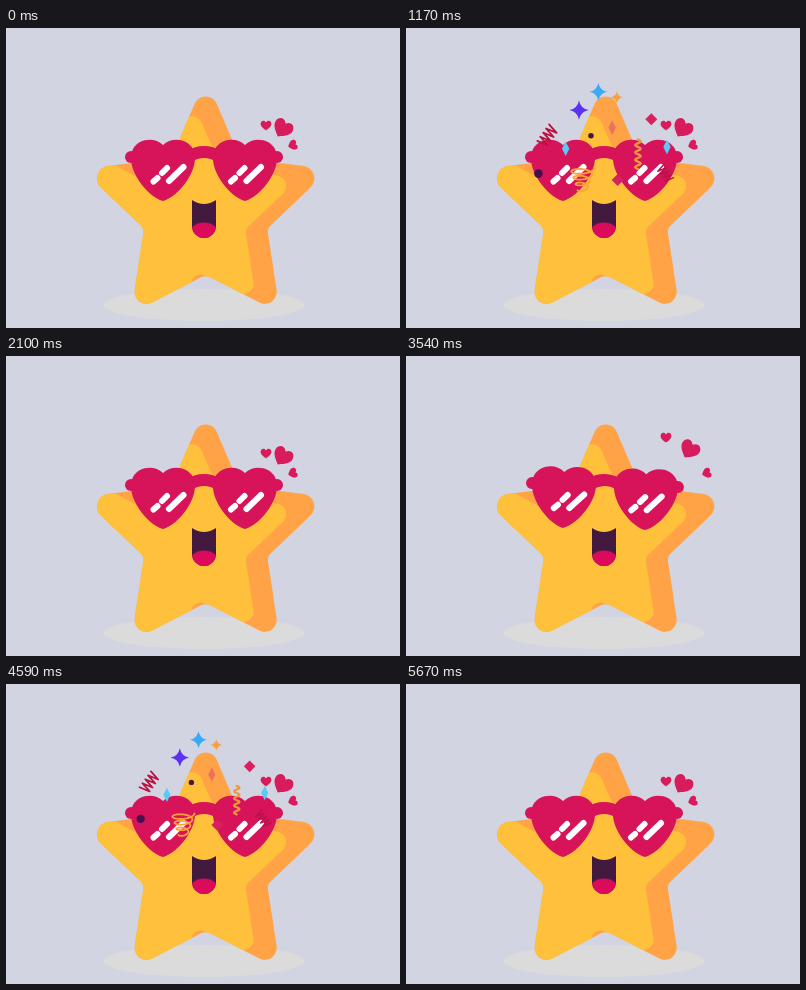
Animation, 394 px wide and 300 px high, one loop 6270 ms. Source, as an HTML page with a canvas:

```html
<!DOCTYPE html>
<html lang="en">
<head>
<meta charset="utf-8">
<title>Party star</title>
<style>
html, body { margin: 0; width: 100%; height: 100%; overflow: hidden; background: #d2d4e1; }
canvas { display: block; width: 394px; height: 300px; }
</style>
</head>
<body>
<canvas id="stage" width="394" height="300"></canvas>
<script>
const ctx = document.getElementById('stage').getContext('2d');
const LOOP = 6270;
const PINK = '#d7145a';
const clamp = v => Math.max(0, Math.min(1, v));

function at(x, y, angle, scale, draw) {
  ctx.save();
  ctx.translate(x, y);
  ctx.rotate(angle);
  ctx.scale(scale, scale);
  draw();
  ctx.restore();
}

function fill(path, color) {
  ctx.fillStyle = color;
  ctx.fill(path);
}

function stroke(path, color, width) {
  ctx.strokeStyle = color;
  ctx.lineWidth = width;
  ctx.lineCap = ctx.lineJoin = 'round';
  ctx.stroke(path);
}

function disc(x, y, rx, ry, color) {
  const p = new Path2D();
  p.ellipse(x, y, rx, ry, 0, 0, Math.PI * 2);
  fill(p, color);
}

// Polygon of [x, y, cornerRadius] points.
function rounded(points) {
  const p = new Path2D();
  const n = points.length;
  const last = points[n - 1];
  p.moveTo((last[0] + points[0][0]) / 2, (last[1] + points[0][1]) / 2);
  points.forEach(([x, y, r], i) => {
    const next = points[(i + 1) % n];
    p.arcTo(x, y, next[0], next[1], r);
  });
  p.closePath();
  return p;
}

const TOP = [199.7, 50, 12];
const RIGHT_SIDE = [[234, 130, 4], [323.5, 141.4, 12.5], [261.3, 200.7, 9], [274.2, 285.3, 12]];
const CROTCH = [199.7, 247, 10];
const mirror = ([x, y, r]) => [399.4 - x, y, r];
const shrink = ([x, y, r]) => [92 + 0.87 * (x - 92), 88 + 0.86 * (y - 69), r * 0.87];

const starPath = rounded([TOP, ...RIGHT_SIDE, CROTCH, ...RIGHT_SIDE.map(mirror).reverse()]);
const lightPath = rounded([
  [150, 160, 0], shrink(TOP), ...RIGHT_SIDE.map(shrink), shrink(CROTCH),
  [185, 300, 0], [60, 300, 0], [60, 110, 0]
]);

const lensPath = new Path2D('M0 -26C-8 -34 -24 -33 -30 -22C-39 -4 -16 26 0 30C16 26 39 -4 30 -22C24 -33 8 -34 0 -26Z');
const glintPath = new Path2D('M-9.5 10.5L-5.5 7M-1 2L4 -3M6 10L20.500 -4');
const bridgePath = new Path2D('M182 129Q198 119 214 129');
const mouthPath = new Path2D('M186 172Q198 180 210 172V198A12 12 0 0 1 186 198Z');
const heartPath = new Path2D('M0 -3C-2 -6 -6 -5 -6 -1C-6 2 -2 4.500 0 6C2 4.500 6 2 6 -1C6 -5 2 -6 0 -3Z');

function drawStar() {
  disc(198, 277, 100, 16, '#dbdbdc');
  fill(starPath, '#ffa346');
  ctx.save();
  ctx.clip(starPath);
  fill(lightPath, '#ffc13b');
  ctx.restore();
  fill(mouthPath, '#43193f');
  ctx.save();
  ctx.clip(mouthPath);
  disc(198, 204.5, 14, 10, '#dc0a5d');
  ctx.restore();
}

function drawGlasses(swing) {
  const angle = swing * 0.0275;
  at(198, 165, angle, 1, () => {
    ctx.translate(-198, -165);
    stroke(bridgePath, PINK, 12);
    for (const x of [157, 239]) {
      at(x, 143, 0, 1, () => fill(lensPath, PINK));
      disc(x === 157 ? 125 : 271, 129, 6, 6, PINK);
    }
    for (const x of [157, 234.5]) at(x, 143, 0, 1, () => stroke(glintPath, '#fff', 6));
  });
}

function drawHearts(swing) {
  const hearts = [
    [260, 97, 0, -16, 0, 0.9],
    [277, 100, 7, -7, 0.55, 1.65],
    [287, 117, 14, 0, 1.25, 0.85]
  ];
  for (const [x, y, dx, dy, angle, size] of hearts) {
    at(x + dx * swing, y + dy * swing, angle, size, () => fill(heartPath, '#d81c5b'));
  }
}

function sparkle(r, color) {
  const p = new Path2D();
  const k = r * 0.16;
  p.moveTo(0, -r);
  p.quadraticCurveTo(k, -k, r, 0);
  p.quadraticCurveTo(k, k, 0, r);
  p.quadraticCurveTo(-k, k, -r, 0);
  p.quadraticCurveTo(-k, -k, 0, -r);
  fill(p, color);
}

function diamond(w, h, color) {
  fill(new Path2D(`M0 ${-h}L${w} 0L0 ${h}L${-w} 0Z`), color);
}

function curve(count, point, color, width) {
  const p = new Path2D();
  for (let i = 0; i <= count; i++) p.lineTo(...point(i / count, i));
  stroke(p, color, width);
}

function zigzag(length, amplitude, color, width) {
  curve(8, (k, i) => [(k - 0.5) * length, i % 2 ? amplitude : -amplitude], color, width);
}

function squiggle() {
  curve(50, k => [3 * Math.sin(k * 8 * Math.PI), (k - 0.5) * 32], '#ef993f', 2.5);
}

function coil() {
  curve(90, k => {
    const a = k * 7 * Math.PI;
    return [(13 - 8 * k) * Math.cos(a), -11 + 24 * k + (4.5 - 2 * k) * Math.sin(a)];
  }, '#ffa338', 2);
}

// Offsets are measured from the middle of the shower.
const PIECES = [
  [-25.5, -28, 0, () => sparkle(10.5, '#5c31f2')],
  [-4.5, -48, 0, () => sparkle(9.5, '#39a9f8')],
  [15.5, -42, 0, () => sparkle(6.5, '#f7a03d')],
  [53, -18, 0, () => diamond(6.5, 6.5, '#d6225f')],
  [16.500, 48, 0, () => diamond(6.5, 6.5, '#d6225f')],
  [10.5, -9, 0, () => diamond(4, 8, '#ef705c')],
  [-40, 14, 0, () => diamond(4, 8, '#5bc9f5')],
  [70, 12, 0, () => diamond(4, 8, '#5bc9f5')],
  [-12.5, 0, 0, () => disc(0, 0, 3, 3, '#48163f')],
  [-69.5, 41, 0, () => disc(0, 0, 4.7, 4.7, '#480f50')],
  [-59.5, 0, -0.95, () => zigzag(22, 6, '#b9123f', 2)],
  [68, 41, 0.95, () => zigzag(18, 5, '#b9124a', 1.5)],
  [38.5, 20, 0, squiggle],
  [-22, 46, 0, coil]
];

function drawConfetti(age) {
  if (age <= 0 || age >= 1960) return;
  const scale = 1 - (1 - clamp(age / 1350)) ** 2;
  const drop = 0.0975 * age + 1.44e-8 * age ** 3;
  ctx.globalAlpha = clamp(age / 700) * clamp((1960 - age) / 460);
  at(196.5, drop, 0, scale, () => {
    for (const [x, y, angle, draw] of PIECES) at(x, y, angle, 1, draw);
  });
  ctx.globalAlpha = 1;
}

// Both showers share one clock; the first joins it midway.
function showTime(t) {
  if (t >= 30 && t < 2100) return t + 3490;
  if (t >= 3060 && t < 5670) return t;
  return 0;
}

function render(t) {
  const clock = showTime(t);
  const swing = Math.sin(Math.PI * clamp((clock - 3060) / 900));
  ctx.fillStyle = '#d2d4e1';
  ctx.fillRect(0, 0, 394, 300);
  drawStar();
  drawGlasses(swing);
  drawHearts(swing);
  drawConfetti(clock - 3690);
}

const start = performance.now();
function tick() {
  render((performance.now() - start) % LOOP);
  requestAnimationFrame(tick);
}
tick();
</script>
</body>
</html>
```
